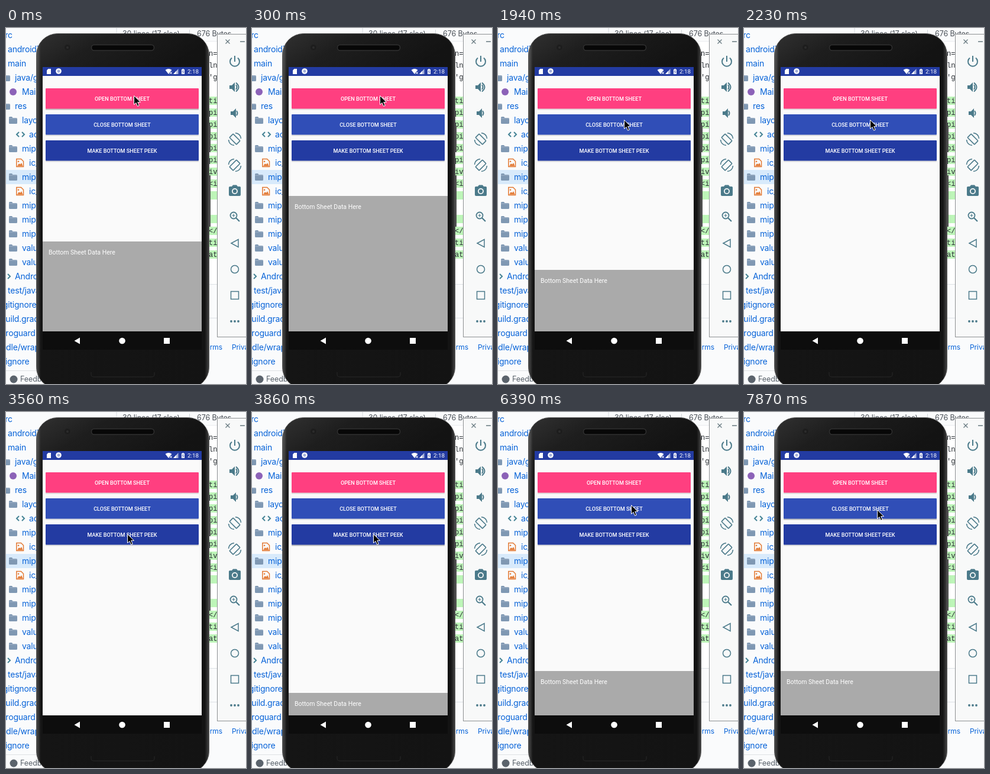
An HTML page for the animation above (8000 ms loop, 406 by 602 pixels).

```html
<!DOCTYPE html>
<html lang="en">
<head>
<meta charset="utf-8">
<title>Bottom sheet demo</title>
<style>
  html, body { margin: 0; width: 100%; height: 100%; overflow: hidden; background: #fafbfc; }
  svg { display: block; width: 406px; height: 602px; }
  text { white-space: pre; }
  .tree { font: 14px Inter, sans-serif; letter-spacing: -.2px; fill: #0763d8; }
  .page { font: 12px Inter, sans-serif; letter-spacing: -.1px; }
  .code { font: 12px "Liberation Mono", monospace; fill: #24292e; }
  .btn { font: 500 9.1px Roboto, sans-serif; fill: #fff; text-anchor: middle; }
  .line { fill: none; stroke: #4b7a8a; stroke-width: 2; }
  .solid { fill: #4b7a8a; }
</style>
</head>
<body>
<svg viewBox="0 0 406 602">
  <defs>
    <linearGradient id="body" x2="1" y2="0">
      <stop offset="0" stop-color="#4a4a4a"/>
      <stop offset=".014" stop-color="#303030"/>
      <stop offset=".025" stop-color="#151515"/>
      <stop offset=".975" stop-color="#131313"/>
      <stop offset=".988" stop-color="#2c2c2c"/>
      <stop offset="1" stop-color="#464646"/>
    </linearGradient>
    <linearGradient id="sheen" x2=".3" y2="1">
      <stop offset="0" stop-color="#fff" stop-opacity=".12"/>
      <stop offset=".12" stop-color="#fff" stop-opacity=".04"/>
      <stop offset=".3" stop-color="#fff" stop-opacity="0"/>
    </linearGradient>
    <clipPath id="screen"><rect x="62" y="66" width="269" height="447"/></clipPath>
    <g id="folder" fill="#7f98b3"><path d="M0 1.5Q0 0 1.5 0H5L6.5 2H12.5Q14 2 14 3.5V10.5Q14 12 12.5 12H1.5Q0 12 0 10.5Z"/><path d="M0 3H14" stroke="#fff" stroke-opacity=".35" stroke-width=".8"/></g>
    <g id="tag" fill="none" stroke="#458395" stroke-width="2"><path d="M5 2L1 6L5 10M10 2L14 6L10 10"/></g>
    <g id="image"><path d="M.8 -.5H8.500L12.500 3.500V12.500H.8Z" fill="none" stroke="#e37933" stroke-width="1.500"/><path d="M2 11.500L5 7L7 9L9 6L11.500 11.500Z" fill="#e37933"/><circle cx="4" cy="3.800" r="1.300" fill="#e37933"/></g>
    <g id="dot"><circle cx="7" cy="6" r="6" fill="#8c62b8"/></g>
  </defs>

  <!-- web page -->
  <rect width="406" height="602" fill="#fafbfc"/>
  <rect x="187" y="-1" width="230" height="24" fill="#fafbfc" stroke="#d8dce0"/>
  <rect x="187" y="23" width="219" height="410" fill="#fff"/>
  <g class="page" fill="#4b5158" style="font-size:12.500px">
    <text x="197" y="14">30 lines (17 sloc)</text>
    <text x="323" y="14">676 Bytes</text>
  </g>
  <path d="M310.500 3V18" stroke="#d0d4d8"/>
  <g id="code"></g>
  <path d="M340 433.500H406M340 490.500H406" stroke="#dde1e5"/>
  <g class="page" fill="#0763d8">
    <text x="366" y="544" text-anchor="end">Terms</text>
    <text x="382" y="544">Privacy</text>
  </g>
  <rect y="240" width="60" height="24" fill="#d8eafb"/>
  <g id="tree"></g>
  <path d="M0 579.500H70" stroke="#dfe2e5"/>
  <circle cx="13" cy="594" r="6.500" fill="#5b636c"/>
  <text class="page" x="24" y="598" fill="#586069" style="font-size:12.500px">Feedback</text>

  <!-- emulator toolbar -->
  <rect x="357.500" y="10.500" width="60" height="512" fill="#f8f9f9" stroke="#8d9092"/>
  <path d="M371.500 19.500L378.500 26.500M378.500 19.500L371.500 26.500M396 23H404" stroke="#66787f" stroke-width="1.300"/>
  <g class="line">
    <path d="M382 50.500A8 8 0 1 0 392 50.500M387 47V57"/>
    <path d="M389 96Q392 100 389 104M389 92.500Q398 100 389 107.500"/>
    <path d="M390 140Q393 144 390 148"/>
    <g id="turn" stroke-width="1.600">
      <rect x="378.700" y="183.700" width="16.600" height="8.600" rx=".8" transform="rotate(45 387 188)"/>
      <path d="M388 177.500Q396.500 178.500 397.500 187M386 198.500Q377.500 197.500 376.500 189"/>
    </g>
    <g transform="translate(774 44) scale(-1 1)"><use href="#turn"/></g>
    <circle cx="385" cy="317" r="5.500" stroke-width="1.800"/>
    <path d="M389 321L395 327" stroke-width="2.200"/>
    <path d="M382.500 317H387.500M385 314.500V319.500" stroke-width="1.200"/>
    <path d="M381 364L393 357.500V370.500Z" stroke-width="1.500"/>
    <circle cx="387" cy="408" r="6.500" stroke-width="1.500"/>
    <rect x="380.500" y="445.500" width="13" height="13" stroke-width="1.500"/>
  </g>
  <g class="solid">
    <path d="M378 97H382L387 92V108L382 103H378Z"/>
    <path d="M380 141H384L389 136V152L384 147H380Z"/>
    <path d="M377 269.500Q377 268 379 268H382L384 265.500H390L392 268H395Q397 268 397 269.500V282Q397 284 395 284H379Q377 284 377 282Z"/>
    <circle cx="387" cy="276" r="5" fill="#f8f9f9"/>
    <circle cx="387" cy="276" r="3.200"/>
    <circle cx="381" cy="496" r="1.900"/><circle cx="387" cy="496" r="1.900"/><circle cx="393" cy="496" r="1.900"/>
  </g>

  <!-- phone -->
  <path d="M345 165V210M345 249V336" stroke="#4c4c4c" stroke-width="2"/>
  <rect x="51.500" y="9.500" width="292" height="600" rx="36" fill="url(#body)" stroke="#555"/>
  <rect x="52" y="10" width="291" height="599" rx="35.500" fill="url(#sheen)"/>
  <rect x="144.500" y="28.500" width="106" height="9.500" rx="4.700" fill="#070707" stroke="#303030" stroke-width="1.500"/>
  <circle cx="104" cy="33" r="5.500" fill="#1d1d1d" stroke="#262626"/>
  <circle cx="104" cy="33" r="2" fill="#2c2c2c"/>
  <path d="M144 582V586Q144 590 149 590H246Q251 590 251 586V582" fill="none" stroke="#282828"/>
  <rect x="62" y="513" width="269" height="31" fill="#0d0d0d"/>
  <rect x="62" y="66" width="269" height="447" fill="#fafafa"/>
  <rect x="62" y="66" width="269" height="15" fill="#233ba2"/>
  <g fill="#fff">
    <path d="M71.500 69H76V78H69V71.500Z"/>
    <circle cx="89" cy="73" r="4.800"/>
    <circle cx="89" cy="73" r="2.500" fill="#a4afd8"/>
    <path d="M269.500 71Q275 67 280.500 71L275 78Z"/>
    <path d="M283 78L291.500 69V78Z" fill="#aeb7dc"/>
    <path d="M283 78L288 72.700V78Z"/>
    <path d="M297 70H298.500V69H300.500V70H302V78H297Z"/>
    <path d="M277 74L281 78M281 74L277 78" stroke="#fff"/>
    <path d="M300 71L298.500 74H300.500L299 77" fill="none" stroke="#233ba2" stroke-width=".8"/>
    <text x="307" y="77" style="font:9.800px Roboto,sans-serif">2:18</text>
    <path d="M115.500 529L125 523.500V534.500Z"/>
    <circle cx="196.500" cy="529" r="5.300"/>
    <rect x="267" y="524" width="10" height="10"/>
  </g>
  <g id="buttons"></g>
  <g clip-path="url(#screen)">
    <g id="sheet">
      <rect x="62" width="269" height="240" fill="#aaa"/>
      <text x="72" y="22" fill="#fff" style="font:10.500px Roboto,sans-serif">Bottom Sheet Data Here</text>
    </g>
  </g>
  <path id="cursor" d="M.5 .5V15.500L4 12.400L6.600 18.300L9.200 17.200L6.700 11.400H11.500Z" fill="#000" stroke="#fff" stroke-linejoin="round"/>
</svg>
<script>
const byId = id => document.getElementById(id);

// Folder tree: text, x, icon; one row every 24 px.
const rows = [
  ['src', -9], ['androidTest', 3], ['main', 3], ['java/guide', 15, 'folder'],
  ['MainActivity', 27, 'dot'], ['res', 15, 'folder'], ['layout', 27, 'folder'],
  ['activity', 39, 'tag'], ['mipmap', 27, 'folder'], ['ic_launcher', 39, 'image'],
  ['mipmap', 27, 'folder'], ['ic_launcher', 39, 'image'], ['mipmap', 27, 'folder'],
  ['mipmap', 27, 'folder'], ['mipmap', 27, 'folder'], ['values', 27, 'folder'],
  ['values', 27, 'folder'], ['AndroidManifest', 15, 'tag'], ['test/java', 3],
  ['.gitignore', -9], ['build.gradle', -9], ['proguard', -9],
  ['gradle/wrapper', -21], ['.gitignore', -21]
];
byId('tree').innerHTML = rows.map(([label, x, icon], i) => {
  const y = 12 + i * 24;
  const mark = icon ? `<use href="#${icon}" x="${x - 22}" y="${y - 6}"/>` : '';
  return `${mark}<text class="tree" x="${x}" y="${y + 5}">${label}</text>`;
}).join('');

// Code lines at the right edge of the phone; green marks added lines.
const code = ['n=', 'ln', "'g", '', 'ti', 'pi', 'pi', 'pi', 'pi', 'pi', 'iv', '&lt;i', '', '', '', '&lt;/', 'ti', 'at'];
byId('code').innerHTML = code.map((part, i) => {
  const y = 43 + i * 20;
  const added = i > 3 && i !== 13;
  const mark = added ? `<rect x="340" y="${y - 7}" width="17" height="14" fill="#bdf5b8"/>` : '';
  return `${mark}<text class="code" x="343" y="${y + 4}">${part}</text>`;
}).join('');

const buttons = [
  ['OPEN BOTTOM SHEET', 102, '#ff3f80'],
  ['CLOSE BOTTOM SHEET', 146, '#304eb7'],
  ['MAKE BOTTOM SHEET PEEK', 190, '#233ba2']
];
byId('buttons').innerHTML = buttons.map(([label, y, fill]) => `
  <rect class="shade" x="67" y="${y + 34}" width="259" height="2.500" fill="#000"/>
  <rect x="67" y="${y}" width="259" height="34.500" rx="1" fill="${fill}"/>
  <text class="btn" x="196.500" y="${y + 20.700}">${label}</text>`).join('');
const shades = document.querySelectorAll('.shade');

const LOOP = 8000;
const HIDDEN = 513, OPEN = 284, PEEK = 438;

// Each state holds until the next entry: time, value(s).
const cursorKeys = [
  [0, 216, 114], [1340, 214, 151], [1490, 213, 155], [2530, 212, 166],
  [2670, 209, 183], [2820, 205, 196], [2970, 199, 215], [3260, 203, 210],
  [3410, 207, 203], [3560, 205, 206], [4910, 252, 156], [5050, 251, 156],
  [5200, 250, 157], [6240, 238, 157], [6390, 225, 157], [6980, 225, 169],
  [7130, 225, 165]
];
const pressKeys = [[0, 0], [300, -1], [1790, 1], [1940, -1], [3860, 2], [4010, -1], [7720, 1]];
const ticks = [0, 150, 300, 450, 1790, 1940, 2090, 2230, 3860, 4010].map(t => [t]);

// Sheet moves: start, duration, from, to.
const moves = [
  [-98, 500, HIDDEN, OPEN], [1867, 500, OPEN, HIDDEN], [3820, 300, HIDDEN, PEEK]
];

const latest = (keys, t) => keys.findLast(key => key[0] <= t);

function sheetTop(t) {
  const [start, span, from, to] = latest(moves, t);
  const left = 1 - Math.min(1, (t - start) / span);
  return to + (from - to) * left ** 5;
}

function draw(t) {
  const [, x, y] = latest(cursorKeys, t);
  byId('cursor').setAttribute('transform', `translate(${x} ${y})`);
  const top = Math.round(sheetTop(latest(ticks, t)[0]));
  byId('sheet').setAttribute('transform', `translate(0 ${top})`);
  const pressed = latest(pressKeys, t)[1];
  shades.forEach((shade, i) => shade.setAttribute('opacity', i === pressed ? .25 : .12));
}

const begin = performance.now();
function tick() {
  draw((performance.now() - begin) % LOOP);
  requestAnimationFrame(tick);
}
tick();
</script>
</body>
</html>
```
